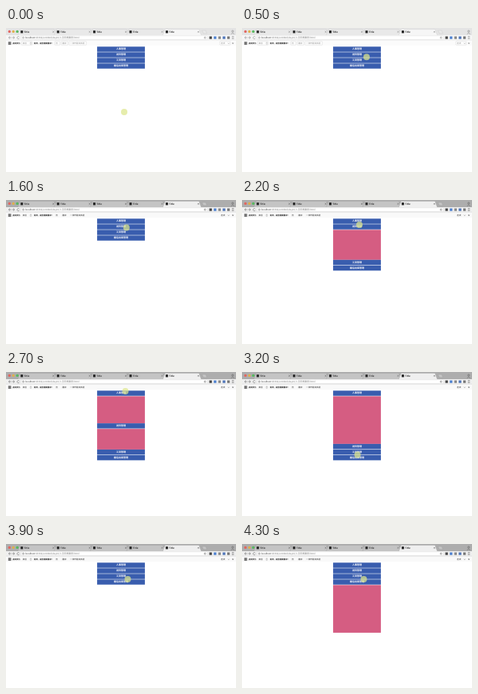
An HTML page for the animation above (4.8 s loop, 288 by 180 pixels).

```html
<!DOCTYPE html>
<html lang="zh">
<head>
<meta charset="utf-8">
<title>Title</title>
<style>
  html, body { margin: 0; width: 100%; height: 100%; overflow: hidden; background: #fff; }
  svg { display: block; width: 288px; height: 180px; }
  text {
    font: 2.6px "Noto Sans CJK SC", "Noto Sans CJK", "Noto Sans", sans-serif;
    fill: #333;
    text-rendering: geometricPrecision;
  }

  .strip { fill: #e4e4e4; }
  .tab { fill: #e9e9e9; stroke: #c4c4c4; stroke-width: .35; }
  .tab.on { fill: #f6f6f6; }
  .bar { fill: #f6f6f6; }
  .notice { fill: #fbfbfb; }
  .line { stroke: #d6d6d6; stroke-width: .4; }
  .icon { fill: none; stroke: #777; stroke-width: .5; }
  .title { font-size: 3px; font-weight: 700; }
  .url { font-size: 2.9px; }
  .url .path { fill: #777; }
  .strong { font-size: 2.4px; font-weight: 700; fill: #222; }
  .button rect { fill: #fdfdfd; stroke: #ccc; stroke-width: .35; }
  .button text { fill: #999; }

  .focus .strip { fill: #adadad; }
  .focus .tab { fill: #c4c4c4; stroke: #999; }
  .focus .tab.on, .focus .bar { fill: #efefef; }
  .focus .notice { fill: #f9f9f9; }
  .focus .line { stroke: #c4c4c4; }
  .focus .button rect { fill: none; stroke: none; }
  .focus .button text { fill: #333; }
  .focus .icon { stroke: #555; }

  .head { fill: #395dae; }
  .panel { fill: #d55d82; }
  .label { font-size: 3px; font-weight: 700; fill: #fff; text-anchor: middle; }
  #cursor { fill: #dde68c; fill-opacity: .72; }
</style>
</head>
<body>
<svg id="stage" viewBox="0 0 288 180">
  <rect class="strip" width="288" height="9.5"/>
  <g id="lights"></g>
  <g id="tabs"></g>
  <path class="tab" d="M245.5 3h4.5l1.6 3.8h-4.5z"/>
  <circle class="icon" cx="283.8" cy="4.1" r="1.1"/>
  <path class="icon" d="M281.8 7.6q2-3 4 0"/>

  <rect class="bar" y="9" width="288" height="6.2"/>
  <path class="icon" d="M5 10.5L3.4 12 5 13.5M3.4 12h3.2M9 10.5l1.6 1.5L9 13.5M10.6 12H7.6M16.6 11.2a1.5 1.5 0 1 0 .2 1.6"/>
  <rect x="19" y="9.8" width="233" height="4.6" rx=".7" fill="#fff" stroke="#ccc" stroke-width=".3"/>
  <circle class="icon" cx="21.6" cy="12.1" r="1"/>
  <text class="url" x="24" y="13.2">localhost<tspan class="path">:63342/untitled/day10/1-手风琴案例.html</tspan></text>
  <circle class="icon" cx="249.2" cy="12.1" r="1"/>
  <g id="addons"></g>
  <path class="icon" d="M282.8 10.6h2.6M282.8 12h2.6M282.8 13.4h2.6"/>

  <rect class="notice" y="15.2" width="288" height="6.8"/>
  <path class="line" d="M0 15.2H288"/>
  <rect x="2.8" y="17.2" width="3.6" height="3.8" fill="#777"/>
  <text class="strong" x="8.2" y="20.1">此网页为</text>
  <text class="strong" x="35" y="20.1">网页，是否需要翻译?</text>
  <g id="buttons"></g>
  <path class="icon" d="M30.2 18.7l.8-.9.8.9M30.2 19.5l.8.9.8-.9"/>
  <path class="icon" d="M278 18.7l.8.9.8-.9M283.2 18.2l1.8 1.8M285 18.2l-1.8 1.8"/>

  <g id="menu"></g>
  <circle id="cursor" r="4"/>
</svg>
<script>
  const LOOP = 4800, STEP = 100, SLIDE = 300;
  const TOP = 23.3, PITCH = 7, HEAD = 6.45, OPEN = 59.6;
  const LEFT = 114.1, WIDTH = 59.8;

  // Which panel is hovered from when; each one closes as the next begins
  const hovers = [
    { panel: 1, at: 2025 },
    { panel: 0, at: 2537 },
    { panel: null, at: 3288 },
    { panel: 3, at: 3991 }
  ];

  // Pointer stops: [time, x, y]
  const stops = [
    [100, 148, 105], [600, 158, 19], [700, 153, 28], [1100, 149, 31],
    [1200, 149, 31], [1400, 150.8, 34.5], [1800, 150.8, 34.5],
    [2200, 147, 31], [2700, 149.5, 24], [3100, 145, 113],
    [3500, 143.5, 74.5], [3900, 152.5, 44]
  ];

  const $ = id => document.getElementById(id);
  const clamp = p => Math.max(0, Math.min(1, p));
  const swing = p => .5 - Math.cos(Math.PI * clamp(p)) / 2;

  function add(parent, tag, attrs, text) {
    const el = document.createElementNS("http://www.w3.org/2000/svg", tag);
    for (const k in attrs) el.setAttribute(k, attrs[k]);
    if (text) el.textContent = text;
    return parent.appendChild(el);
  }

  function addButton(x, width, label) {
    const g = add($("buttons"), "g", { class: "button" });
    add(g, "rect", { x, y: 16.7, width, height: 4.6, rx: .6 });
    add(g, "text", { x: x + 1.3, y: 20.1 }, label);
  }

  function addTab(i) {
    const g = add($("tabs"), "g", { transform: `translate(${17.6 + i * 45.4})` });
    add(g, "path", { class: i === 4 ? "tab on" : "tab", d: "M-3 9.4L0 1.6H42.5L45.5 9.4" });
    add(g, "rect", { x: .7, y: 3.2, width: 3, height: 3.2, fill: "#222" });
    add(g, "text", { class: "title", x: 4.9, y: 5.9 }, "Title");
    add(g, "path", { class: "icon", d: "M40.8 4l1.7 1.7M42.5 4l-1.7 1.7" });
  }

  function addItem(label) {
    const g = add($("menu"), "g", {});
    add(g, "rect", { class: "head", x: LEFT, width: WIDTH, height: HEAD });
    add(g, "text", { class: "label", x: 144, y: 4.2 }, label);
    const panel = add(g, "rect", { class: "panel", x: LEFT, y: PITCH, width: WIDTH });
    return { g, panel };
  }

  ["#e2655f", "#e0b04a", "#55b95e"].forEach((fill, i) =>
    add($("lights"), "circle", { cx: 4.3 + i * 4.9, cy: 4.4, r: 1.6, fill }));
  ["#444", "#4a7fd0", "#888", "#4a72b8", "#777"].forEach((fill, i) =>
    add($("addons"), "rect", { x: 254.6 + i * 5.6, y: 10.5, width: 3.2, height: 3.2, fill }));
  for (let i = 0; i < 5; i++) addTab(i);

  addButton(19.4, 13.4, "英语");
  addButton(61, 6.6, "否");
  addButton(69.2, 8.4, "翻译");
  addButton(79, 21.6, "一律不翻译英语");
  addButton(267.8, 13, "选项");

  const items = ["人事管理", "进货管理", "工资管理", "最后出库管理"].map(addItem);

  function panelHeight(panel, t) {
    const n = hovers.findIndex(h => h.panel === panel);
    if (n < 0) return 0;
    const close = n + 1 < hovers.length ? hovers[n + 1].at : LOOP;
    return OPEN * (swing((t - hovers[n].at) / SLIDE) - swing((t - close) / SLIDE));
  }

  function pointer(t) {
    const next = stops.findIndex(s => s[0] > t);
    const n = next < 0 ? stops.length - 1 : Math.max(1, next);
    const [t0, x0, y0] = stops[n - 1], [t1, x1, y1] = stops[n];
    const p = clamp((t - t0) / (t1 - t0));
    return [x0 + (x1 - x0) * p, y0 + (y1 - y0) * p];
  }

  function draw() {
    // The picture advances ten times a second
    const t = Math.floor(performance.now() % LOOP / STEP) * STEP;
    $("stage").classList.toggle("focus", t >= 1600);
    let y = TOP;
    items.forEach(({ g, panel }, i) => {
      const h = panelHeight(i, t);
      g.setAttribute("transform", `translate(0 ${y})`);
      panel.setAttribute("height", h);
      y += PITCH + h;
    });
    const [cx, cy] = pointer(t);
    $("cursor").setAttribute("cx", cx);
    $("cursor").setAttribute("cy", cy);
    requestAnimationFrame(draw);
  }
  draw();
</script>
</body>
</html>
```
